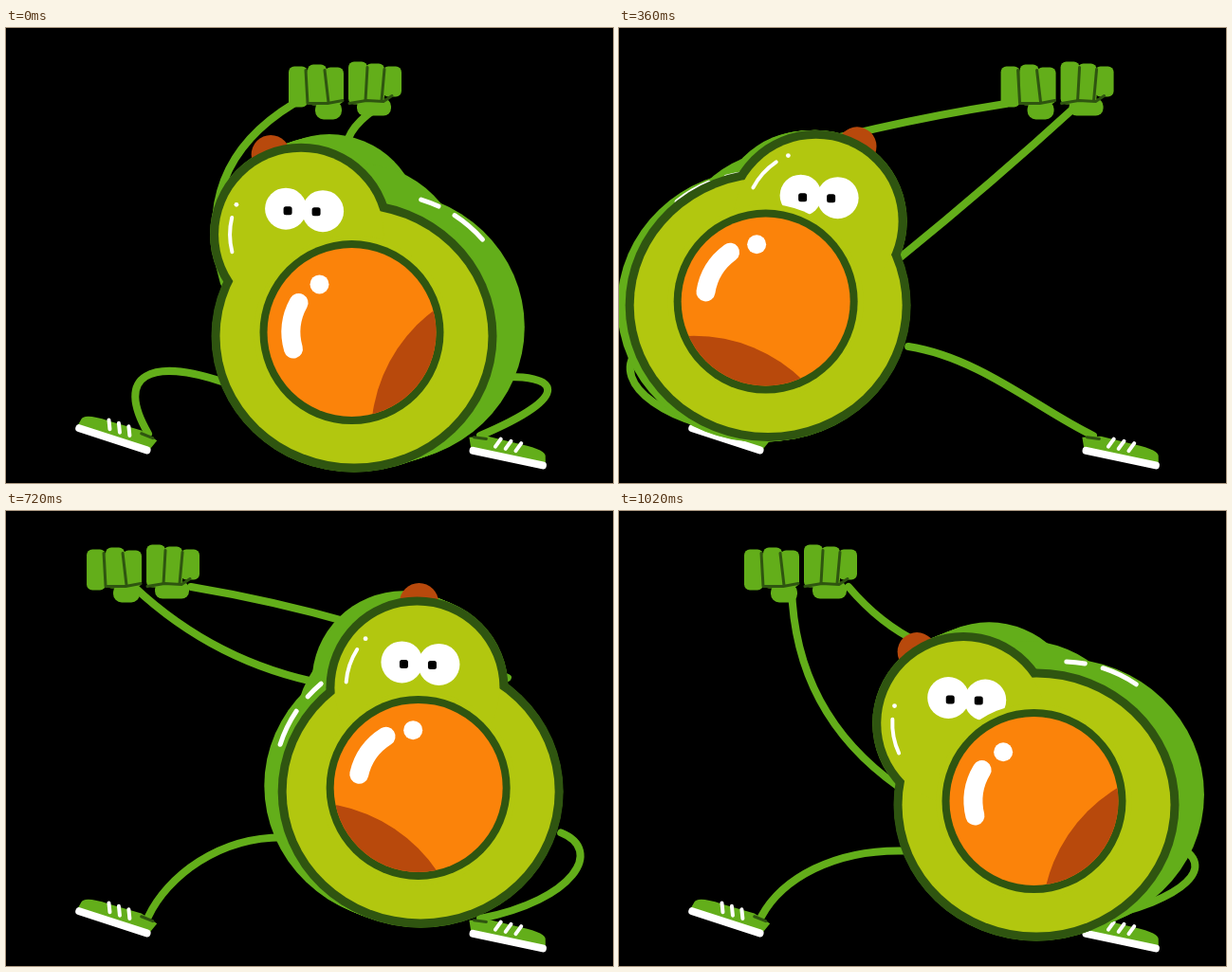
An HTML page with a canvas that plays this animation: 640 px wide and 480 px high, repeating every 1.08 s.

```html
<!DOCTYPE html>
<html lang="en">
<head>
<meta charset="utf-8">
<title>Stretching avocado</title>
<style>
html, body { margin: 0; width: 100%; height: 100%; overflow: hidden; background: #000; }
canvas { display: block; }
</style>
</head>
<body>
<canvas id="stage" width="640" height="480"></canvas>
<script>
const ctx = document.getElementById('stage').getContext('2d');
const LOOP = 1080, STEP = 60, RAD = Math.PI / 180;
const SKIN = '#63ae1a', FLESH = '#b2c70f', LINE = '#2f5510', PIT = '#fb830a', RED = '#b8490c', WHITE = '#fff';

// Key poses: time, body x, head tilt in degrees, hands x.
const POSES = [
  [0, 367, -29, 298],
  [120, 250, -18, 431],
  [240, 178, 8, 434],
  [480, 178, 46, 334],
  [600, 356, 18, 114],
  [840, 480, -20, 98],
  [1020, 440, -44, 132]
];

const sin = a => Math.sin(a * RAD);
const cos = a => Math.cos(a * RAD);
const clamp = (v, lo, hi) => Math.max(lo, Math.min(hi, v));

// Periodic cubic spline through one column of the key poses.
function spline(col, t) {
  const n = POSES.length;
  const key = i => POSES[(i + n) % n][col];
  const time = i => POSES[(i + n) % n][0] + LOOP * Math.floor(i / n);
  let i = n - 1;
  while (time(i) > t) i--;
  const span = time(i + 1) - time(i), u = (t - time(i)) / span;
  const slope = j => (key(j + 1) - key(j - 1)) / (time(j + 1) - time(j - 1)) * span;
  const m0 = slope(i), m1 = slope(i + 1), d = key(i + 1) - key(i);
  return key(i) + u * (m0 + u * (3 * d - 2 * m0 - m1 + u * (m0 + m1 - 2 * d)));
}

function oval(x, y, rx, ry, color) {
  ctx.fillStyle = color;
  ctx.beginPath();
  ctx.ellipse(x, y, rx, ry, 0, 0, 7);
  ctx.fill();
}

const disc = (x, y, r, color) => oval(x, y, r, r, color);

function box(x, y, w, h, r, color) {
  ctx.fillStyle = color;
  ctx.beginPath();
  ctx.roundRect(x, y, w, h, r);
  ctx.fill();
}

function stroke(color, width, trace) {
  ctx.strokeStyle = color;
  ctx.lineWidth = width;
  ctx.beginPath();
  trace();
  ctx.stroke();
}

function line(color, width, x, y, ...rest) {
  stroke(color, width, () => {
    ctx.moveTo(x, y);
    for (let i = 0; i < rest.length; i += 2) ctx.lineTo(rest[i], rest[i + 1]);
  });
}

function shine(x, y, r, from, sweep, width) {
  stroke(WHITE, width, () => ctx.arc(x, y, r, from * RAD, (from + sweep) * RAD, sweep < 0));
}

// An arm bows sideways from the straight line between shoulder and wrist.
function arm(sx, sy, wx, wy, bow) {
  const dx = wx - sx, dy = wy - sy, k = bow / Math.hypot(dx, dy);
  stroke(SKIN, 8, () => {
    ctx.moveTo(sx, sy);
    ctx.quadraticCurveTo((sx + wx) / 2 - dy * k, (sy + wy) / 2 + dx * k, wx, wy);
  });
}

// A leg bends outwards; the further it reaches, the straighter it gets.
function leg(hipX, hipY, ankleX, ankleY, out) {
  const reach = (ankleX - hipX) * out;
  const drop = Math.abs(reach - 65) * 0.32;
  const thigh = 75 + 0.35 * Math.min(reach, 0);
  const shin = 100 - 0.8 * Math.max(reach, 0);
  stroke(SKIN, 8, () => {
    ctx.moveTo(hipX, hipY);
    ctx.bezierCurveTo(hipX + out * thigh, hipY - 30 + drop,
      ankleX + out * shin, ankleY - 68 + drop, ankleX, ankleY);
  });
}

function fists(x, y) {
  ctx.save();
  ctx.translate(x, y);
  box(28, 38, 28, 20, 9, SKIN);
  box(72, 36, 36, 18, 8, SKIN);
  for (const [left, top, height] of [[0, 2, 43], [20, 0, 43], [38, 3, 39], [63, -3, 45], [81, -1, 41], [99, 2, 32]]) {
    box(left, top, 20, height, 6, SKIN);
  }
  line(LINE, 3, 18, 6, 20, 41, 41, 41, 57, 38);
  line(LINE, 3, 38, 6, 42, 40);
  line(LINE, 3, 64, 41, 82, 38, 100, 39, 109, 33);
  line(LINE, 3, 83, 3, 81, 38);
  line(LINE, 3, 101, 5, 98, 38);
  ctx.restore();
}

// Drawn with the ankle at the origin and the toe pointing along +x.
function shoe(x, y, angle, toe) {
  ctx.save();
  ctx.translate(x, y);
  ctx.scale(toe, 1);
  ctx.rotate(angle * RAD);
  ctx.fillStyle = SKIN;
  ctx.beginPath();
  ctx.moveTo(-11, 4);
  ctx.lineTo(8, -1);
  ctx.lineTo(44, 0);
  ctx.quadraticCurveTo(72, 0, 72, 8);
  ctx.lineTo(74, 17);
  ctx.lineTo(-6, 17);
  ctx.fill();
  line(LINE, 3, -6, 3, 7, 2);
  line(WHITE, 8, -4, 17, 71, 17);
  for (let i = 0; i < 3; i++) line(WHITE, 4, 22 + i * 11, -1, 18 + i * 11, 8);
  ctx.restore();
}

function draw(t) {
  const x = spline(1, t), tilt = spline(2, t), hand = spline(3, t);
  const angle = 360 * t / LOOP;
  const hop = 2 * angle - 20;
  const turn = cos(angle - 7);
  const y = 298 + 17 * cos(hop) + 6 * cos(2 * hop);
  const neck = 105 + 11 * cos(hop);
  const slack = 40 + 40 * cos(hop);
  const headX = x + neck * sin(tilt), headY = y - neck * cos(tilt);
  const backX = 2 + 28 * turn, backY = -5 - 6 * cos(angle + 40);

  ctx.fillStyle = '#000';
  ctx.fillRect(0, 0, 640, 480);
  ctx.lineCap = ctx.lineJoin = 'round';

  // limbs
  leg(x - 138, y + 55, 150, 428, -1);
  leg(x + 148, y + 50, 500, 430, 1);
  shoe(150, 428, -18, -1);
  shoe(500, 430, 12, 1);
  for (const side of [-1, 1]) {
    const sx = x + 146 * sin(tilt + 41 * side), sy = y - 146 * cos(tilt + 41 * side);
    const grip = side < 0 ? clamp(sx - hand, 5, 50) : clamp(sx - hand, 82, 110);
    arm(sx, sy, hand + grip, 80, side < 0 ? -slack : -turn * slack);
  }
  fists(hand, 38.5);

  // thickness behind the cut face
  for (let i = 0; i <= 8; i++) {
    const dx = backX * i / 8, dy = backY * i / 8;
    oval(x + dx, y + 6.5 + dy, 150, 143.5, SKIN);
    disc(headX + dx, headY + dy, 96, SKIN);
  }
  disc((x + headX) / 2 + backX, (y + headY) / 2 + backY, 116, SKIN);
  const facing = Math.sign(turn), gleam = tilt - 86 + 42 * facing;
  shine(x + backX, y + 6 + backY, 140, gleam, 8 * facing, 5);
  shine(x + backX, y + 6 + backY, 140, gleam + 16 * facing, 16 * facing, 5);
  const stem = 0.82 * tilt + 3;
  disc(headX + 90 * sin(stem), headY - 90 * cos(stem), 20.5, RED);

  // cut face
  for (const [inset, color] of [[0, LINE], [9, FLESH]]) {
    oval(x, y + 6.5, 150.5 - inset, 143.5 - inset, color);
    disc(headX, headY, 96 - inset, color);
  }
  const glint = 214 + 0.7 * tilt;
  shine(headX, headY, 75, glint, -28, 4);
  disc(headX + 75 * cos(glint + 11), headY + 75 * sin(glint + 11), 2.4, WHITE);

  // eyes
  const eyeX = headX - 16, eyeY = headY - 27;
  disc(eyeX, eyeY, 22, WHITE);
  disc(eyeX + 39, eyeY + 2.5, 22, WHITE);
  box(eyeX - 2.5, eyeY - 2.5, 9, 9, 2.5, '#000');
  box(eyeX + 27.5, eyeY - 1.5, 9, 9, 2.5, '#000');

  // pit
  const pitX = x - 2.5, pitY = y + 2.5;
  disc(pitX, pitY, 103, FLESH);
  disc(pitX, pitY, 97, LINE);
  disc(pitX, pitY, 89, PIT);
  ctx.save();
  ctx.beginPath();
  ctx.arc(pitX, pitY, 89, 0, 7);
  ctx.clip();
  const patch = 88 - 58 * turn;
  disc(pitX + 215 * cos(patch), pitY + 215 * sin(patch), 165, RED);
  ctx.restore();
  const gloss = 227 - 18 * turn;
  shine(pitX, pitY, 64, gloss, -45, 20);
  disc(pitX + 61 * cos(gloss + 27), pitY + 61 * sin(gloss + 27), 10, WHITE);
}

const start = performance.now();
function tick() {
  const t = (performance.now() - start) % LOOP;
  draw(Math.floor(t / STEP) * STEP);
  requestAnimationFrame(tick);
}
tick();
</script>
</body>
</html>
```
